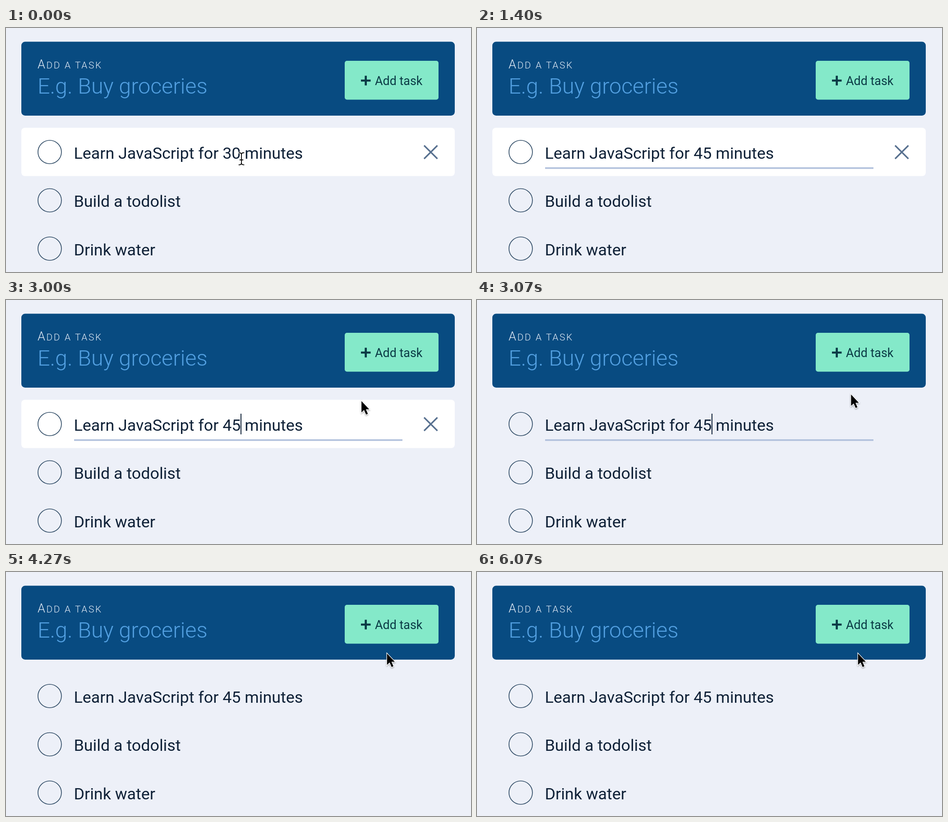
An HTML page for the animation above (6140 ms loop, 1031 by 543 pixels).

```html
<!DOCTYPE html>
<html lang="en">
<head>
<meta charset="utf-8">
<title>Todo list</title>
<style>
  html, body { margin: 0; height: 100%; overflow: hidden; background: #edf0f8; }
  svg { display: block; width: 1031px; height: 543px; font-family: Roboto, sans-serif; }
  text { white-space: pre; }
  .item text { font-size: 35.85px; fill: #0f2137; }
  .item circle { fill: none; stroke: #334e68; stroke-width: 1.7; }
</style>
</head>
<body>
<svg viewBox="0 0 1031 543">
  <defs>
    <filter id="shadow" x="-50%" y="-50%" width="200%" height="200%">
      <feDropShadow dx="0" dy="1.5" stdDeviation="1.5" flood-opacity=".4"/>
    </filter>
  </defs>

  <rect x="34" y="30.5" width="961" height="164.5" rx="8.5" fill="#084b81"/>
  <text x="70" y="90" font-size="26.9" font-weight="300" letter-spacing="2.7" fill="#e6eef8">A<tspan font-size="20.8">DD A TASK</tspan></text>
  <text x="70" y="146" font-size="48.4" font-weight="300" fill="#529fe0">E.g. Buy groceries</text>
  <rect x="751" y="73" width="208" height="86.5" rx="5" fill="#84e9c9"/>
  <path d="M787 117h21.5M797.7 106.3v21.5" stroke="#0a3a45" stroke-width="4.6"/>
  <text x="818" y="127" font-size="26.9" fill="#0a3a45">Add task</text>

  <g id="hover">
    <rect x="34" y="222" width="961" height="107.5" rx="8" fill="#fff"/>
    <path d="M927 261.5l29.5 29.5m0-29.5L927 291" stroke="#57708f" stroke-width="3.3"/>
  </g>

  <g class="item"><circle cx="96.9" cy="276" r="26"/><text id="task" x="150.5" y="290.5"></text></g>
  <g class="item" transform="translate(0 107.5)"><circle cx="96.9" cy="276" r="26"/><text x="150.5" y="290.5">Build a todolist</text></g>
  <g class="item" transform="translate(0 215)"><circle cx="96.9" cy="276" r="26"/><text x="150.5" y="290.5">Drink water</text></g>

  <rect id="underline" x="151" y="310" width="728" height="3.5" fill="#b0c0dc"/>
  <rect id="caret" x="520" y="253" width="2" height="46" fill="#0f2137"/>

  <g id="beam" fill="none" stroke-linecap="round">
    <path id="beamShape" d="M-5.5-13.5Q0-13.5 0-9.5Q0-13.5 5.5-13.5M0-9.5V9.5M-5.5 13.5Q0 13.5 0 9.5Q0 13.5 5.5 13.5M-3.5 2.5H3.5" stroke="#fff" stroke-width="4"/>
    <use href="#beamShape" style="display:none"/>
    <path d="M-5.5-13.5Q0-13.5 0-9.5Q0-13.5 5.5-13.5M0-9.5V9.5M-5.5 13.5Q0 13.5 0 9.5Q0 13.5 5.5 13.5M-3.5 2.5H3.5" stroke="#000" stroke-width="1.8"/>
  </g>
  <path id="arrow" d="M.8 2V27.2L6.5 21.8L11 32L15 30.3L10.6 20.3H18Z" fill="#000" stroke="#fff" stroke-width="2.4" paint-order="stroke" filter="url(#shadow)"/>
</svg>
<script>
  const LOOP = 6140;
  const $ = id => document.getElementById(id);
  const show = (id, on) => $(id).style.display = on ? '' : 'none';
  const within = (t, spans) => spans.some(([from, to]) => t >= from && t < to);

  const edits = [[0, '30'], [930, '3'], [1130, ''], [1270, '4'], [1400, '45']];
  const caretOn = [[200, 670], [1870, 2330], [2830, 3330], [3870, 4200]];
  // time, x, y of the pointer
  const path = [[2670, 522, 291], [2800, 610, 276], [2930, 745, 238], [3070, 828.5, 208.5], [3270, 844, 179.5]];

  function pointer(t) {
    if (t <= path[0][0]) return path[0].slice(1);
    const i = path.findIndex(p => p[0] > t);
    if (i < 0) return path.at(-1).slice(1);
    const [t0, x0, y0] = path[i - 1], [t1, x1, y1] = path[i];
    const k = (t - t0) / (t1 - t0);
    return [x0 + (x1 - x0) * k, y0 + (y1 - y0) * k];
  }

  function draw(now) {
    const t = now % LOOP;
    const minutes = edits.findLast(e => e[0] <= t)[1];
    const [x, y] = pointer(t);
    const overInput = y > 245;

    $('task').textContent = `Learn JavaScript for ${minutes} minutes`;
    show('hover', y > 222);
    show('underline', within(t, [[200, 4200]]));
    show('caret', within(t, caretOn));
    show('beam', overInput && !within(t, [[930, 2670]]));
    show('arrow', !overInput);
    for (const id of ['beam', 'arrow']) $(id).setAttribute('transform', `translate(${x} ${y})`);
    requestAnimationFrame(draw);
  }
  draw(performance.now());
</script>
</body>
</html>
```
